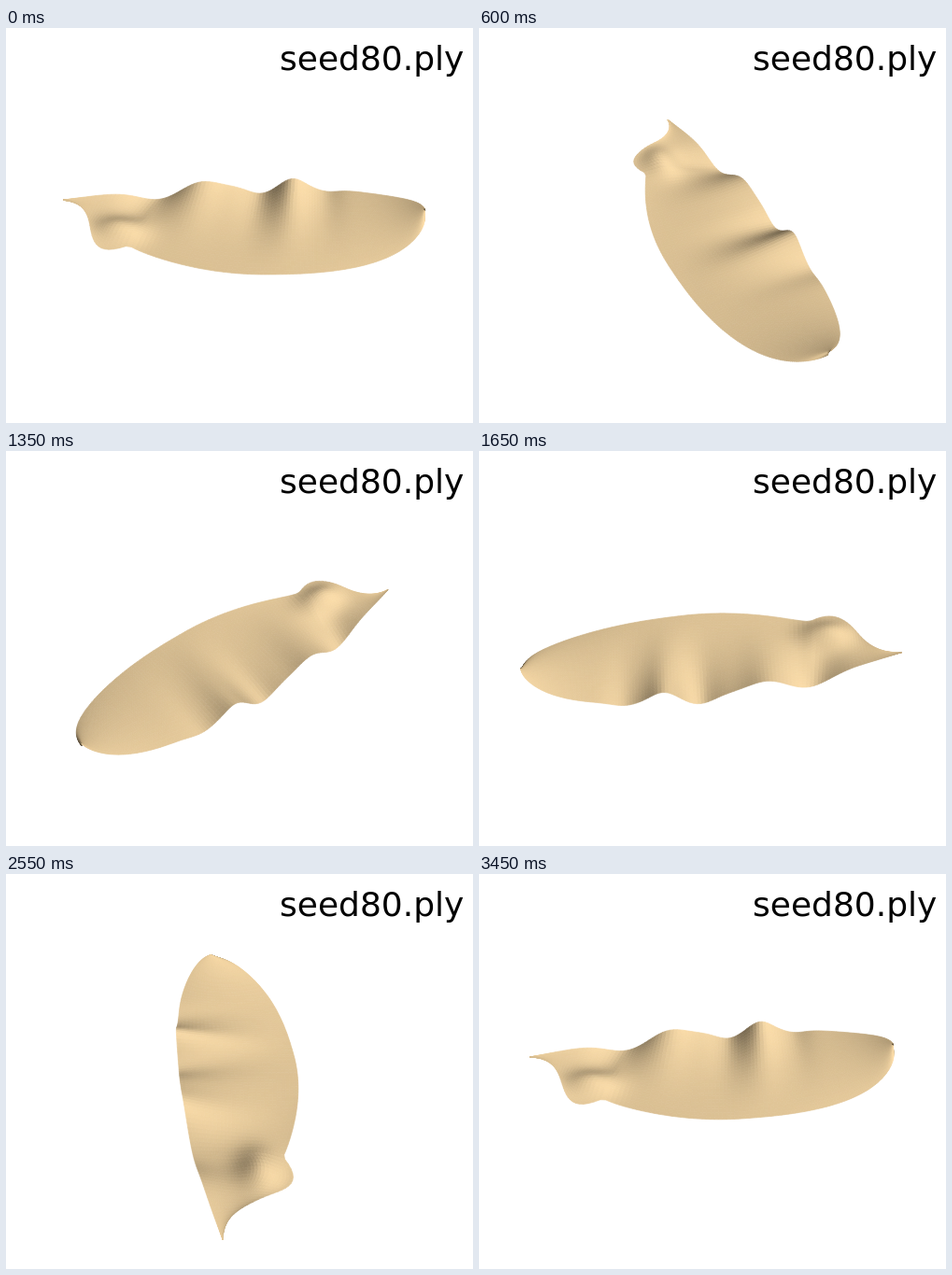
An HTML page with a canvas for the animation above (3.5 s loop, 500 by 423 pixels).

```html
<!DOCTYPE html>
<html lang="en">
<head>
<meta charset="utf-8">
<title>Turntable</title>
<style>
  html, body { margin: 0; width: 500px; height: 423px; overflow: hidden; background: #fff; }
  canvas, svg { position: absolute; left: 0; top: 0; display: block; }
  text { font: 36px "DejaVu Sans", sans-serif; }
</style>
</head>
<body>
<canvas id="stage" width="500" height="423"></canvas>
<svg width="500" height="423"><text x="293" y="45">seed80.ply</text></svg>
<script>
const ctx = document.getElementById('stage').getContext('2d');
const STEPS = 70, STEP_MS = 50;
const ROWS = 140, COLS = 28;
const DIST = 680, TILT = Math.SQRT1_2;
const LIGHT = [0.48, -0.36, 0.8];
const TAN = [255, 224, 172];
const END = 197;      // half length of the sheet
const NECK = 0.27;    // share of the length taken by the flap

const lerp = (a, b, f) => a + (b - a) * f;
const clamp = (v, lo, hi) => Math.min(hi, Math.max(lo, v));
const bell = (d, w) => Math.exp(-((d / w) ** 2));
const bezier = (a, b, c, d, t) => {
  const v = 1 - t;
  return a * v ** 3 + 3 * b * v * v * t + 3 * c * v * t * t + d * t ** 3;
};

// Outline bulging to `peak` at x = mid, rounding off to y = 8 at the end
function bulge(x, mid, peak, drop, reach) {
  if (x < mid) return peak - drop * ((mid - x) / reach) ** 2;
  const r = Math.min(1, (x - mid) / (END - mid));
  return 8 + (peak - 8) * Math.sqrt(1 - r ** 2.4);
}

function wavyEdge(s) {
  const x = lerp(-END, END, s);
  return [x, bulge(x, 10, 64, 23, 207)];
}

function smoothEdge(s) {
  if (s < NECK) {
    const t = 1 - s / NECK;
    return [bezier(-116, -176, -142, -END, t), bezier(-26, -54, 34, 41, t)];
  }
  const x = lerp(-116, END, (s - NECK) / (1 - NECK));
  return [x, bulge(x, 25, -64, -38, 141)];
}

// Ruffles of the wavy edge: centre, height, width
const ruffles = [[-94, -15, 30], [-42, 9, 25], [24, -11, 21], [60, 13, 18], [100, -4, 16]];

function surface(s, u) {
  const [ax, ay] = wavyEdge(s), [bx, by] = smoothEdge(s);
  const x = lerp(ax, bx, u), y = lerp(ay, by, u);
  const wave = ruffles.reduce((sum, [c, h, w]) => sum + h * bell(ax - c, w), 0);
  const sag = u * (1 - u) * (ay - by) / 60 * (0.06 * x - 4);
  const lip = 12 * bell(x + 128, 26) * bell(y + 2, 20);
  const lift = 16 * Math.exp((x - END) / 30);
  const edge = -5 * u * u * Math.min(1, s / NECK);
  return [x, y, wave * (1 - u) ** 2 + edge + sag + lip + lift];
}

function faceNormal(a, b, c, d) {
  const p = c.map((n, k) => n - a[k]), q = d.map((n, k) => n - b[k]);
  const n = [p[1] * q[2] - p[2] * q[1], p[2] * q[0] - p[0] * q[2], p[0] * q[1] - p[1] * q[0]];
  const len = Math.hypot(...n) * (n[2] < 0 ? -1 : 1) || 1;
  return n.map(k => k / len);
}

const points = [], faces = [];
for (let i = 0; i <= ROWS; i++)
  for (let j = 0; j <= COLS; j++)
    points.push(surface(Math.sin(i / ROWS * Math.PI / 2), j / COLS));
for (let i = 0; i < ROWS; i++)
  for (let j = 0; j < COLS; j++) {
    const a = i * (COLS + 1) + j;
    const ids = [a, a + 1, a + COLS + 2, a + COLS + 1];
    faces.push({ ids, normal: faceNormal(...ids.map(k => points[k])) });
  }

function spin([x, y, z], c, s) {
  return [x * c + y * s, y * c - x * s, z];
}

function project([x, y, z]) {
  const depth = (y - z) * TILT, k = DIST / (DIST + depth);
  return [250 + x * k, 212 - (y + z) * TILT * k, depth];
}

function shade(n) {
  if (n[2] < n[1]) n = n.map(v => -v);
  const lit = n[0] * LIGHT[0] + n[1] * LIGHT[1] + n[2] * LIGHT[2];
  const level = clamp(0.86 + 0.7 * (lit - 0.8), 0.4, 1.06);
  return `rgb(${TAN.map(v => Math.min(255, Math.round(v * level)))})`;
}

function draw(step) {
  const angle = step / STEPS * 2 * Math.PI;
  const c = Math.cos(angle), s = Math.sin(angle);
  const flat = points.map(p => project(spin(p, c, s)));
  for (const f of faces) f.depth = flat[f.ids[0]][2] + flat[f.ids[2]][2];
  ctx.clearRect(0, 0, 500, 423);
  ctx.lineWidth = 0.7;
  ctx.lineJoin = 'round';
  for (const f of [...faces].sort((p, q) => q.depth - p.depth)) {
    ctx.fillStyle = ctx.strokeStyle = shade(spin(f.normal, c, s));
    ctx.beginPath();
    for (const k of f.ids) ctx.lineTo(flat[k][0], flat[k][1]);
    ctx.closePath();
    ctx.fill();
    ctx.stroke();
  }
}

let shown = -1;
const start = performance.now();
function tick() {
  const step = Math.floor((performance.now() - start) / STEP_MS) % STEPS;
  if (step !== shown) draw(shown = step);
  requestAnimationFrame(tick);
}
tick();
</script>
</body>
</html>
```
